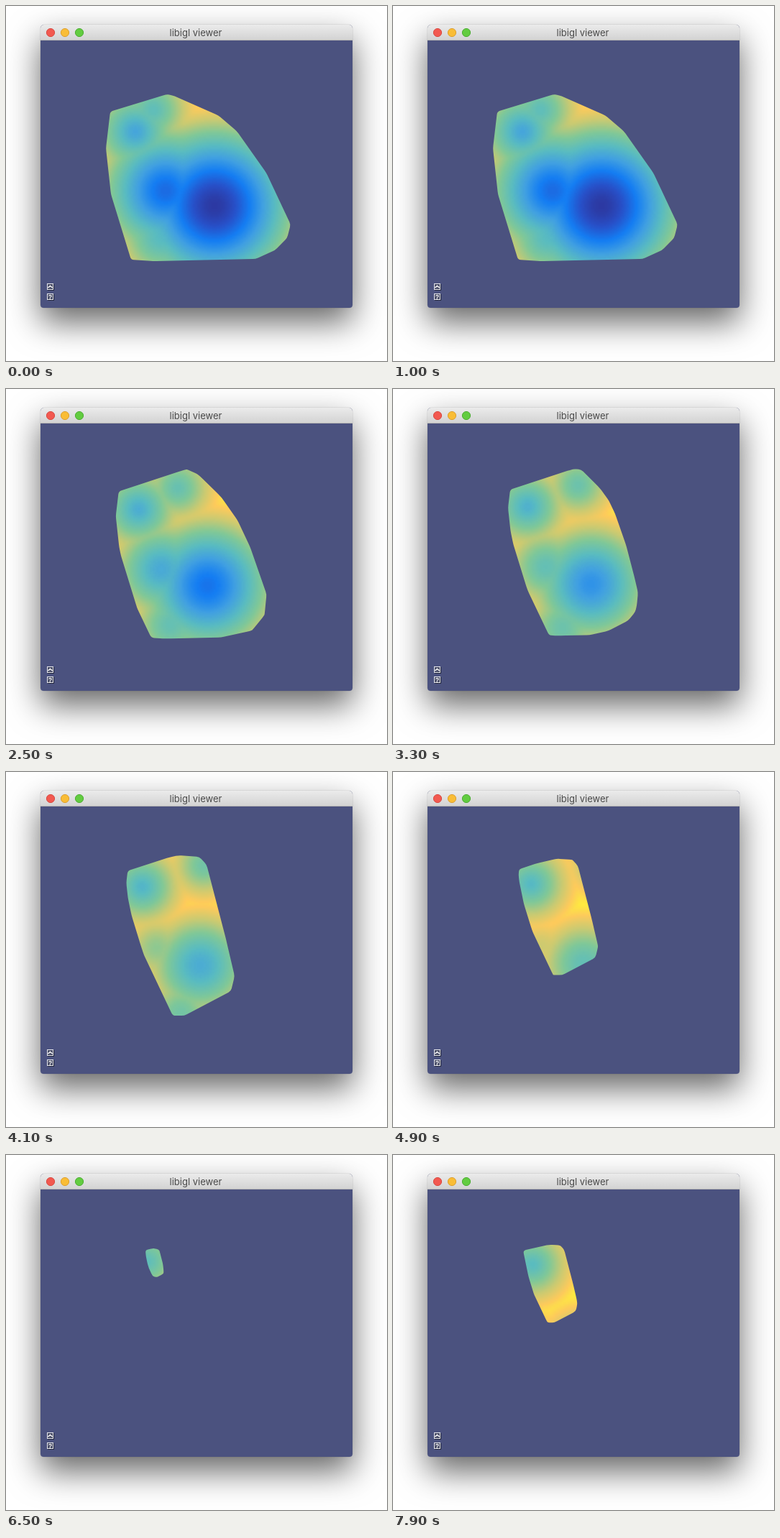
Animation of 530 by 494 pixels, one loop 8000 ms. Source, as an HTML page with a canvas:

```html
<!DOCTYPE html>
<html lang="en">
<head>
<meta charset="utf-8">
<title>libigl viewer</title>
<style>
  html, body { margin: 0; width: 100%; height: 100%; overflow: hidden; background: #fff; }
  canvas { display: block; width: 530px; height: 494px; }
</style>
</head>
<body>
<canvas id="stage" width="530" height="494"></canvas>
<script>
const ctx = document.getElementById('stage').getContext('2d');
const LOOP = 8000, STEP = 100, TURN = 13500, FIRST = 1000, LAST = 6500;

// A convex solid: corner points by depth, where depth is the time the cutting plane meets them.
const solid = [
  [FIRST, '145,147 223,123 231,124 295,152 321,174 362,232 396,304 391,323 374,340 347,352 205,355 174,353 146,262 139,198'],
  [2700, '358,283 355,314 338,335'],
  [2900, '258,109'],
  [4100, '170,138 269,118 279,129 318,284 313,305 248,339 232,339 192,255 169,163'],
  [5600, '181,133'],
  [6850, '199,132 204,134 205,145 200,144']
].flatMap(([t, list]) => list.split(' ').map(p => [...p.split(',').map(Number), t]));

// Distance minima drifting evenly through the cuts: [x, y, value] at first and last cut, core size.
const wells = [
  { a: [290, 278, .03], b: [255, 262, .74], core: 26 }, // body
  { a: [222, 257, .20], b: [200, 235, 1.0], core: 20 }, // chest
  { a: [180, 175, .40], b: [197, 148, .52], core: 8 },  // head
  { a: [205, 145, .52], b: [330, 118, .62], core: 12 }, // ear
  { a: [215, 322, .50], b: [265, 345, .65], core: 20 }  // foot
];
const SLOPE = .0075, SOFT = .025;

const lerp = (a, b, f) => a + (b - a) * f;

function makePalette(colors) {
  const c = document.createElement('canvas');
  c.width = 256;
  c.height = 1;
  const g = c.getContext('2d'), ramp = g.createLinearGradient(0, 0, 256, 0);
  colors.forEach((color, i) => ramp.addColorStop(i / (colors.length - 1), color));
  g.fillStyle = ramp;
  g.fillRect(0, 0, 256, 1);
  return new Uint32Array(g.getImageData(0, 0, 256, 1).data.buffer);
}
const palette = makePalette([
  '#2e3296', '#2850c8', '#147df3', '#41a0e1', '#5abcc0', '#80c898', '#c8ca73', '#fdca5c', '#fff437'
]);

// Monotone chain.
function hull(points) {
  points.sort((p, q) => p[0] - q[0] || p[1] - q[1]);
  const half = list => {
    const out = [];
    for (const p of list) {
      while (out.length > 1) {
        const [a, b] = out.slice(-2);
        if ((b[0] - a[0]) * (p[1] - a[1]) - (b[1] - a[1]) * (p[0] - a[0]) > .01) break;
        out.pop();
      }
      out.push(p);
    }
    return out.slice(0, -1);
  };
  return [...half(points), ...half(points.slice().reverse())];
}

function crossSection(t) {
  const cuts = [];
  for (const p of solid.filter(p => p[2] <= t)) {
    for (const q of solid.filter(q => q[2] > t)) {
      const f = (t - p[2]) / (q[2] - p[2]);
      cuts.push([lerp(p[0], q[0], f), lerp(p[1], q[1], f)]);
    }
  }
  return hull(cuts);
}

function softPolygon(points) {
  const n = points.length, path = new Path2D();
  const toward = (p, q) => {
    const f = Math.min(.35, 4 / (Math.hypot(q[0] - p[0], q[1] - p[1]) || 1));
    return [lerp(p[0], q[0], f), lerp(p[1], q[1], f)];
  };
  points.forEach((p, i) => {
    path.lineTo(...toward(p, points[(i + n - 1) % n]));
    path.quadraticCurveTo(...p, ...toward(p, points[(i + 1) % n]));
  });
  path.closePath();
  return path;
}

// Half-size colour field, scaled up under the clip.
const SIDE = 140;
const field = document.createElement('canvas');
field.width = field.height = SIDE;
const fctx = field.getContext('2d');
const image = fctx.createImageData(SIDE, SIDE);
const pixels = new Uint32Array(image.data.buffer);

function paintField(t) {
  const f = (t - FIRST) / (LAST - FIRST);
  const now = wells.map(w => [...w.a.map((v, i) => lerp(v, w.b[i], f)), w.core]);
  for (let i = 0; i < pixels.length; i++) {
    const px = 131 + i % SIDE * 2, py = 101 + Math.floor(i / SIDE) * 2;
    let sum = 1e-30;
    for (const [x, y, v, core] of now) {
      const d = Math.sqrt((px - x) ** 2 + (py - y) ** 2 + core * core) - core;
      sum += Math.exp(-(v + SLOPE * d) / SOFT);
    }
    const v = Math.min(1, Math.max(0, -SOFT * Math.log(sum)));
    pixels[i] = palette[Math.round(v * 255)];
  }
  fctx.putImageData(image, 0, 0);
}

function drawSlice(t) {
  paintField(t);
  ctx.save();
  ctx.clip(softPolygon(crossSection(t)));
  ctx.drawImage(field, 130, 100, SIDE * 2, SIDE * 2);
  ctx.restore();
}

// The whole grey model in front of the cut, built from shaded ellipses.
function drawModel() {
  const parts = [
    [380, 327, 21, 22, 0], [222, 155, 20, 50, .4], [157, 152, 19, 46, -.35],
    [200, 290, 55, 78, 0], [200, 356, 60, 19, 0], [282, 283, 106, 92, .15], [172, 203, 51, 44, .2]
  ];
  for (const [x, y, rx, ry, turn] of parts) {
    ctx.save();
    ctx.translate(x, y);
    ctx.rotate(turn);
    ctx.scale(rx, ry);
    const g = ctx.createRadialGradient(-.1, -.2, 0, 0, 0, 1);
    g.addColorStop(0, '#cfcfcf');
    g.addColorStop(1, '#9c9c9c');
    ctx.fillStyle = g;
    ctx.beginPath();
    ctx.arc(0, 0, 1, 0, Math.PI * 2);
    ctx.fill();
    ctx.restore();
  }
}

function drawIcon(y, mark) {
  ctx.fillStyle = '#22263c';
  ctx.fillRect(58, y + 1, 9, 9);
  ctx.fillStyle = '#e4e5ea';
  ctx.fillRect(57, y, 9, 9);
  ctx.fillStyle = '#4a4e68';
  ctx.fillRect(58, y + 1, 7, 7);
  mark();
}

function drawWindow() {
  const frame = new Path2D();
  frame.roundRect(48, 26, 434, 394, [5, 5, 4, 4]);
  ctx.fillStyle = '#fff';
  ctx.fillRect(0, 0, 530, 494);
  ctx.save();
  ctx.shadowColor = 'rgba(0,0,0,.6)';
  ctx.shadowBlur = 46;
  ctx.shadowOffsetY = 20;
  ctx.fill(frame);
  ctx.restore();
  ctx.strokeStyle = 'rgba(0,0,0,.12)';
  ctx.lineWidth = 1;
  ctx.stroke(frame);

  ctx.save();
  ctx.clip(frame);
  ctx.fillStyle = '#4b527f';
  ctx.fillRect(48, 26, 434, 394);
  const bar = ctx.createLinearGradient(0, 26, 0, 48);
  bar.addColorStop(0, '#ebebeb');
  bar.addColorStop(1, '#d2d2d2');
  ctx.fillStyle = bar;
  ctx.fillRect(48, 26, 434, 21);
  ctx.fillStyle = '#b4b4b4';
  ctx.fillRect(48, 47, 434, 1);
  ctx.restore();

  [['#f25950', '#d9473f'], ['#f9bd36', '#dd9f2e'], ['#62cc40', '#4bad31']].forEach(([fill, rim], i) => {
    ctx.beginPath();
    ctx.arc(62 + i * 20, 37, 5.6, 0, Math.PI * 2);
    ctx.fillStyle = fill;
    ctx.fill();
    ctx.strokeStyle = rim;
    ctx.stroke();
  });

  ctx.fillStyle = '#4a4a4a';
  ctx.font = '13px Inter, "Liberation Sans", sans-serif';
  ctx.textAlign = 'center';
  ctx.fillText('libigl viewer', 264, 42);

  drawIcon(386, () => {
    ctx.strokeStyle = '#fff';
    ctx.lineWidth = 1.6;
    ctx.beginPath();
    ctx.moveTo(58.5, 392);
    ctx.lineTo(61.5, 389.5);
    ctx.lineTo(64.5, 392);
    ctx.stroke();
  });
  drawIcon(400, () => {
    ctx.fillStyle = '#fff';
    ctx.font = 'bold 9px "Liberation Sans", Arial, sans-serif';
    ctx.fillText('?', 61.5, 408);
  });
}

let shown = -1;
function tick(now) {
  const t = Math.floor(now % LOOP / STEP) * STEP;
  if (t !== shown) {
    shown = t;
    drawWindow();
    drawSlice(Math.max(FIRST, Math.min(t, TURN - t)));
    if (t >= 500 && t < FIRST) drawModel();
  }
  requestAnimationFrame(tick);
}
tick(performance.now());
</script>
</body>
</html>
```
